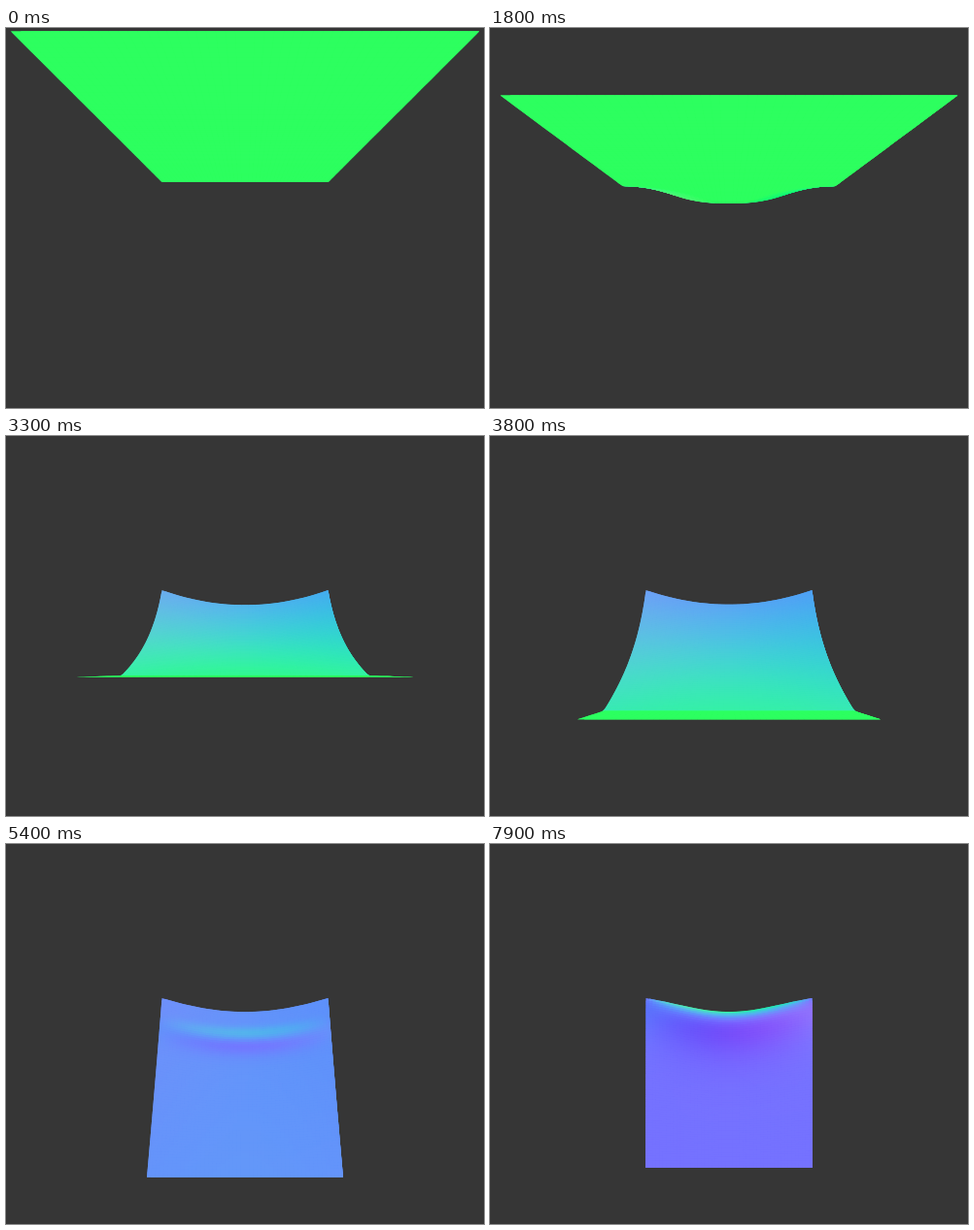
These frames come from a looping animation (492 by 392 pixels, 8000 ms). An HTML page with a canvas:

```html
<!DOCTYPE html>
<html lang="en">
<head>
<meta charset="utf-8">
<title>Falling cloth</title>
<style>
  html, body { margin: 0; height: 100%; overflow: hidden; background: #363636; }
  canvas { display: block; }
</style>
</head>
<body>
<canvas id="stage" width="492" height="392"></canvas>
<script>
const ctx = document.getElementById('stage').getContext('2d');
const LOOP = 8000, STEP = 100, RELEASE = 650, FIRST_MOVE = 800;
const COLS = 48, ROWS = 72, SIDE = 2;
const CENTER_X = 246, CENTER_Y = 244.5, UNIT = 85.5, CAMERA = 3.1;

const { min, max, abs, exp, hypot, PI } = Math;
const clamp = (n, low, high) => max(low, min(high, n));
const bump = (n, center, width) => exp(-(((n - center) / width) ** 2));
const ramp = (n, from, to) => {
  const k = clamp((n - from) / (to - from), 0, 1);
  return k * k * (3 - 2 * k);
};

// Gives the 3D point of the cloth at (x, v), s seconds after its release.
// x runs from -1 to 1, v from the edge pinned at both corners to the free edge.
function clothAt(s) {
  // The free edge swings down around the pinned one.
  const pull = .0645 + .0177 * ramp(s, 3.05, 4.45);
  const angle = PI / 2 * min(1, 1.008 * (1 - exp(-pull * s * s)));
  const radius = SIDE + .04 * ramp(s, 3, 4.2) - .125 * bump(s, 2.6, .9);
  const edgeY = 1 - radius * Math.sin(angle), edgeZ = radius * Math.cos(angle);

  // The part still falling flat shrinks as the pull of the pins spreads.
  const flat = SIDE * max(0, 1 - s / 4.6) ** 1.5;
  const rise = flat * ramp(s, 3.1, 4);
  const depth = max(0, edgeZ - flat);
  const reach = min(1, .15 + .63 * s), level = ramp(s, 1.3, 1.95);
  const sag = min(1 - edgeY, .165 + .35 * exp(-1.2 * s));
  const bend = .3 * bump(s, 3, 1), ease = ramp(s, 4, 7) / 2;

  // A fold travels up to the pinned edge and widens.
  const foldV = .29 - .1 * (s - 5.75), foldPower = 300 * foldV ** 3;
  const foldHeight = .105 * ramp(s, 4.2, 5.7);

  return (x, v) => {
    const u = min(1, (1 - abs(x)) / reach);
    const round = 1 - (1 - u) ** 2;
    const topY = 1 - sag * (round + ease * ((1 - Math.cos(PI * u)) / 2 - round));
    const front = 1 - u * u;
    const kinkY = edgeY + rise, kinkZ = depth * (front + (1 - front) * level);
    const kinkV = SIDE - hypot(edgeZ - kinkZ, rise);
    let y, z;
    if (v >= kinkV) {
      const k = (v - kinkV) / max(1e-6, SIDE - kinkV);
      y = kinkY + (edgeY - kinkY) * k;
      z = kinkZ + (edgeZ - kinkZ) * k;
    } else {
      const dy = kinkY - topY, chord = hypot(kinkZ, dy) || 1;
      const controlY = (topY + kinkY) / 2 - bend * kinkZ / chord;
      const controlZ = kinkZ / 2 + bend * dy / chord;
      const k = v / kinkV, w = 1 - k;
      y = w * w * topY + 2 * w * k * controlY + k * k * kinkY;
      z = 2 * w * k * controlZ + k * k * kinkZ;
    }
    const f = v / foldV;
    z += foldHeight * (1 - x * x) * (f * exp(1 - f)) ** foldPower;
    return [x, y, z];
  };
}

function project([x, y, z]) {
  const scale = UNIT * CAMERA / (CAMERA - z);
  return [CENTER_X + x * scale, CENTER_Y - y * scale];
}

const minus = (a, b) => a.map((n, i) => n - b[i]);

function normalColor(a, b, c, d) {
  const [px, py, pz] = minus(d, a), [qx, qy, qz] = minus(b, c);
  const n = [py * qz - pz * qy, pz * qx - px * qz, px * qy - py * qx];
  const length = hypot(...n) || 1;
  const [nx, ny, nz] = n.map(k => k / length);
  const rgb = [118 - 73 * max(0, ny) + 128 * nx, 113 + 142 * ny, 95 + 160 * nz];
  return `rgb(${rgb.map(k => clamp(Math.round(k), 0, 255)).join()})`;
}

function draw(t) {
  const cloth = clothAt(t < FIRST_MOVE ? 0 : (t - RELEASE) / 1000);
  const points = Array.from({ length: ROWS + 1 }, (_, r) =>
    Array.from({ length: COLS + 1 }, (_, c) => cloth(2 * c / COLS - 1, SIDE * r / ROWS)));
  const screen = points.map(row => row.map(project));
  ctx.fillStyle = '#363636';
  ctx.fillRect(0, 0, 492, 392);
  // Nearer rows cover those behind; each cell reaches under the next ones to hide seams.
  for (let r = 0; r < ROWS; r++) {
    for (let c = 0; c < COLS; c++) {
      const right = min(c + 2, COLS), below = min(r + 2, ROWS);
      ctx.fillStyle = normalColor(points[r][c], points[r][c + 1], points[r + 1][c], points[r + 1][c + 1]);
      ctx.beginPath();
      for (const [i, j] of [[r, c], [r, right], [below, right], [below, c]]) ctx.lineTo(...screen[i][j]);
      ctx.fill();
    }
  }
}

let shown = -1;
function tick() {
  const t = Math.floor(performance.now() % LOOP / STEP) * STEP;
  if (t !== shown) draw(shown = t);
  requestAnimationFrame(tick);
}
tick();
</script>
</body>
</html>
```
